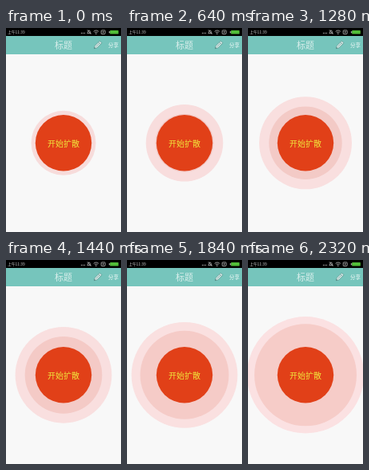
Recreate the animation shown at these times as an HTML page. Size 144 px wide and 256 px high, loop 2400 ms.

```html
<!DOCTYPE html>
<html lang="zh-CN">
<head>
<meta charset="utf-8">
<title>扩散</title>
<style>
  html, body { margin: 0; width: 100%; height: 100%; overflow: hidden; background: #f8f8f8; }
  svg { display: block; width: 100vw; height: 100vh; }
  text { font-family: "Noto Sans CJK SC", "Noto Sans CJK", sans-serif; }
  .line { fill: none; stroke: #bdbdbd; stroke-width: .8; }
</style>
</head>
<body>
<svg viewBox="0 0 144 256">
  <rect width="144" height="256" fill="#f8f8f8"/>

  <circle id="outer" cx="72" cy="144.3" r="40.5"/>
  <circle id="inner" cx="72" cy="144.3" r="0"/>
  <circle cx="72" cy="144.3" r="35.2" fill="#e14018"/>
  <text x="72" y="149" font-size="10" font-weight="500" text-anchor="middle" fill="#f0e63c">开始扩散</text>

  <rect y="10" width="144" height="23" fill="#76c5bc"/>
  <text x="72" y="25.7" font-size="11" text-anchor="middle" fill="#d9efec">标题</text>
  <text x="128" y="24" font-size="6.5" font-weight="500" fill="#f4fbfa">分享</text>

  <g transform="translate(115 21.2) rotate(-45)">
    <path d="M-6.5 0L-3.4 -1.9H5.2V1.9H-3.4Z" fill="#d5e6e4" stroke="#4f8d87" stroke-width=".6"/>
    <path d="M-3.2 0H2.8M3 -1.9V1.9" fill="none" stroke="#5f9690" stroke-width=".6"/>
    <path d="M-6.6 0L-5 -.9V.9Z" fill="#3f6f6a"/>
  </g>

  <rect width="144" height="10" fill="#000"/>
  <text x="2" y="6.9" font-size="4.8" fill="#d4d4d4">上午11:39</text>
  <g fill="#bdbdbd">
    <circle cx="94.5" cy="6.4" r=".6"/>
    <circle cx="96.5" cy="6.4" r=".6"/>
    <circle cx="98.5" cy="6.4" r=".6"/>
    <circle cx="112.8" cy="7.2" r=".7"/>
  </g>
  <g class="line">
    <path d="M101.8 6.7Q102.6 6 102.6 4.6Q102.8 3 104 3T105.4 4.6Q105.4 6 106.2 6.7ZM102 2.4L106.4 7.7"/>
    <path d="M109.6 4.3Q112.8 1.5 116 4.3M111 5.8Q112.8 4.3 114.6 5.8"/>
    <rect x="119.2" y="2.9" width="5" height="4.6" rx=".8"/>
    <path d="M120.7 4.2L122.7 6.2M122.7 4.2L120.7 6.2"/>
  </g>
  <rect x="130.2" y="3" width="10.6" height="4.5" rx=".6" fill="#52bd38"/>
  <rect x="128.8" y="4.2" width="1.4" height="2.1" fill="#a8a8a8"/>
</svg>
<script>
  const LOOP = 2400, STEP = 80;
  const outer = document.getElementById('outer');
  const inner = document.getElementById('inner');

  // [time, radius]
  const outerPath = [[0, 40.5], [640, 48.3], [1040, 54], [1280, 58], [1600, 62.8], [2080, 70], [2320, 73.2]];
  const innerPath = [[480, 34], [640, 36.5], [1040, 41.8], [1280, 45.7], [1600, 51], [2080, 60], [2320, 64]];

  function radius(path, t) {
    if (t <= path[0][0]) return path[0][1];
    for (let i = 1; i < path.length; i++) {
      const [t0, r0] = path[i - 1], [t1, r1] = path[i];
      if (t <= t1) return r0 + (r1 - r0) * (t - t0) / (t1 - t0);
    }
    return path[path.length - 1][1];
  }

  function mix(a, b, k) {
    return `rgb(${a.map((v, i) => Math.round(v + (b[i] - v) * k))})`;
  }

  function draw(now) {
    const t = Math.floor((now % LOOP) / STEP) * STEP;
    const k = t / LOOP;
    outer.setAttribute('r', radius(outerPath, t));
    outer.setAttribute('fill', mix([247, 220, 219], [251, 225, 226], k));
    inner.setAttribute('r', radius(innerPath, t));
    inner.setAttribute('fill', mix([240, 199, 196], [246, 204, 200], k));
  }

  const start = performance.now();
  function tick() {
    draw(performance.now() - start);
    requestAnimationFrame(tick);
  }
  tick();
</script>
</body>
</html>
```
